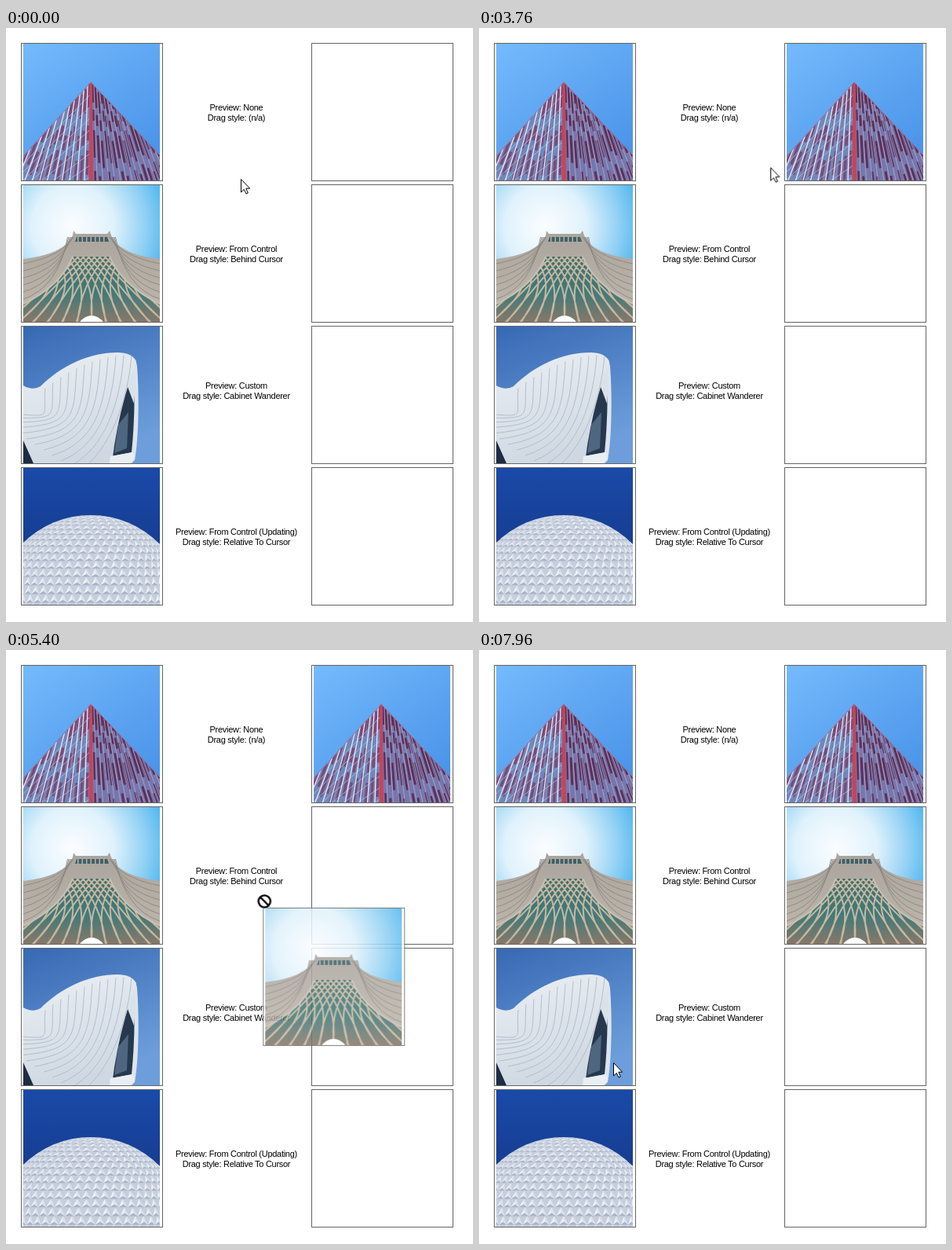
These frames come from a looping animation (595x756 px, 8000 ms). An HTML page:

```html
<!DOCTYPE html>
<html lang="en">
<head>
<meta charset="utf-8">
<title>Drag previews</title>
<style>
html, body { margin: 0; width: 100%; height: 100%; overflow: hidden; background: #fff; }
svg { display: block; }
#stage { width: 100vw; height: 100vh; }
text { font: 11px "Liberation Sans", Arial, sans-serif; letter-spacing: -.28px; text-anchor: middle; }
.box { fill: #fff; stroke: #646464; }
.line { fill: none; }

#pointer { animation: travel 8s linear infinite; }
#arrow { animation: arrow 8s step-end infinite; }
#ban { animation: ban 8s step-end infinite; }
#preview { opacity: .86; animation: preview 8s step-end infinite; }
#drop1 { animation: drop1 8s step-end infinite; }
#drop2 { animation: drop2 8s step-end infinite; }

@keyframes travel {
  0%, 3.5% { transform: translate(299px, 192px); }
  5.5%, 8% { transform: translate(293px, 174px); }
  17% { transform: translate(218px, 167px); }
  18% { transform: translate(200px, 160px); }
  20% { transform: translate(148px, 138px); }
  21% { transform: translate(140px, 135px); }
  22% { transform: translate(152px, 134px); }
  27.5% { transform: translate(392px, 128px); }
  28.5% { transform: translate(423px, 128px); }
  30.5% { transform: translate(460px, 129px); }
  31.5%, 40.5% { transform: translate(462px, 129px); }
  43% { transform: translate(440px, 140px); }
  50% { transform: translate(320px, 205px); }
  57% { transform: translate(185px, 295px); }
  60% { transform: translate(141px, 318px); }
  61%, 62% { transform: translate(130px, 322px); }
  67.5% { transform: translate(329px, 320px); }
  70.5% { transform: translate(392px, 285px); }
  72% { transform: translate(420px, 262px); }
  73.5%, 84% { transform: translate(434px, 248px); }
  87% { transform: translate(408px, 282px); }
  94% { transform: translate(262px, 438px); }
  99.5%, 100% { transform: translate(171px, 525px); }
}
@keyframes arrow {
  0%, 27.5%, 70.5%, 100% { visibility: visible; }
  21%, 62% { visibility: hidden; }
}
@keyframes ban {
  0%, 27.5%, 70.5%, 100% { visibility: hidden; }
  21%, 62% { visibility: visible; }
}
@keyframes preview {
  0%, 73.5%, 100% { visibility: hidden; }
  62% { visibility: visible; }
}
@keyframes drop1 {
  0% { visibility: hidden; }
  30.5%, 100% { visibility: visible; }
}
@keyframes drop2 {
  0% { visibility: hidden; }
  73.5%, 100% { visibility: visible; }
}
</style>
</head>
<body>
<svg id="stage" viewBox="0 0 595 756">
  <defs>
    <linearGradient id="sky1" x2=".7" y2="1">
      <stop stop-color="#74bafd"/><stop offset="1" stop-color="#4a93e8"/>
    </linearGradient>
    <radialGradient id="sky2" cx=".36" cy=".3" r=".75">
      <stop stop-color="#fbfdff"/><stop offset=".4" stop-color="#e0f2fc"/>
      <stop offset=".72" stop-color="#8fd0f4"/><stop offset="1" stop-color="#3fb0ee"/>
    </radialGradient>
    <linearGradient id="sky3" x2=".4" y2="1">
      <stop stop-color="#3768b3"/><stop offset="1" stop-color="#6d9edb"/>
    </linearGradient>
    <linearGradient id="sky4" x2="0" y2="1">
      <stop stop-color="#1a4aa8"/><stop offset=".6" stop-color="#163c90"/>
    </linearGradient>
    <linearGradient id="stone" x2="0" y2="1">
      <stop stop-color="#aaa49d"/><stop offset="1" stop-color="#c0b8ad"/>
    </linearGradient>
    <linearGradient id="vaultTone" x2="0" y2="1">
      <stop stop-color="#3c6d70"/><stop offset=".6" stop-color="#3f7a7a"/><stop offset="1" stop-color="#86786a"/>
    </linearGradient>
    <linearGradient id="shellTone" x2=".3" y2="1">
      <stop stop-color="#f0f4f8"/><stop offset="1" stop-color="#cfd8e2"/>
    </linearGradient>
    <clipPath id="leftFace"><path d="M86 49L0 143V174H86Z"/></clipPath>
    <clipPath id="rightFace"><path d="M86 49L174 142V174H86Z"/></clipPath>
    <clipPath id="vault"><path d="M63 91H110Q126 128 174 151V174H0V151Q48 128 63 91Z"/></clipPath>
    <clipPath id="shell"><path d="M0 75Q12 82 22 76C48 50 84 33 120 33Q138 33 144 44Q120 110 113 174H13L0 145Z"/></clipPath>
    <clipPath id="dome"><circle cx="86" cy="183" r="123"/></clipPath>

    <symbol id="tower" viewBox="0 0 174 174">
      <path fill="url(#sky1)" d="M0 0H174V174H0Z"/>
      <g clip-path="url(#leftFace)" class="line">
        <path fill="#7187b9" d="M0 0H174V174H0Z"/>
        <path id="leftGlass" stroke="#7d4a75" stroke-width="3.5" stroke-dasharray="19 13 31 22"/>
        <path id="floors" stroke="#a6bfe4" stroke-width=".8"/>
        <path id="mullions" stroke="#e4e9f5" stroke-width="1.3"/>
      </g>
      <g clip-path="url(#rightFace)" class="line">
        <path fill="#7478ae" d="M0 0H174V174H0Z"/>
        <path id="rightGlass" stroke="#5b3159" stroke-width="3" stroke-dasharray="27 9 14 12 35 17"/>
        <path id="ribs" stroke="#b5a2c6" stroke-width=".9"/>
      </g>
      <path d="M84.5 50L83.5 174H89L87.5 50Z" fill="#c94358"/>
      <path d="M86 49L0 143M86 49L174 142" stroke="#a26a91" class="line"/>
    </symbol>

    <symbol id="arch" viewBox="0 0 174 174">
      <path fill="url(#sky2)" d="M0 0H174V174H0Z"/>
      <path fill="url(#stone)" d="M0 94Q52 88 63 64L64 58 67 62H107L110 58 112 64Q122 88 174 94V174H0Z"/>
      <path id="slabs" class="line" stroke="#8c877f" stroke-width=".9"/>
      <path d="M68 66H107L109 72H66Z" fill="#3f6068"/>
      <path d="M69 69H107" stroke="#b7b1a7" stroke-width="6" stroke-dasharray="1.5 4" class="line"/>
      <g clip-path="url(#vault)" class="line">
        <path fill="url(#vaultTone)" d="M0 80H174V174H0Z"/>
        <path id="lattice" stroke="#c6b69e" stroke-width="2"/>
      </g>
      <path d="M63 91Q48 128 0 151M110 91Q126 128 174 151" class="line" stroke="#c9c0b3" stroke-width="2"/>
      <path d="M72 174Q79 166 87 166T102 174Z" fill="#fff"/>
    </symbol>

    <symbol id="curve" viewBox="0 0 174 174">
      <path fill="url(#sky3)" d="M0 0H174V174H0Z"/>
      <path fill="#1d2d43" d="M0 143L14 174H0Z"/>
      <path fill="#dce4ec" d="M120 34Q143 34 145 50C148 90 147 142 142 170L138 174H100Z"/>
      <path fill="#25384e" d="M140 43Q144 100 138 160L113 165Q122 90 140 43Z"/>
      <path fill="#d9e1e9" d="M140 44Q145 66 141 98L132 74Z"/>
      <path fill="#4e6680" d="M121 125L134 109 132 155 116 161Z"/>
      <g clip-path="url(#shell)" class="line">
        <path fill="url(#shellTone)" d="M0 0H174V174H0Z"/>
        <path id="contours" stroke="#aeb9c6" stroke-width=".9"/>
      </g>
      <path fill="#e9eef3" d="M111 165L140 160 142 168 136 174H110Z"/>
    </symbol>

    <symbol id="sphere" viewBox="0 0 174 174">
      <path fill="url(#sky4)" d="M0 0H174V174H0Z"/>
      <g clip-path="url(#dome)">
        <path fill="#c6cedc" d="M0 50H174V174H0Z"/>
        <path id="facet0" fill="#edf1f7"/>
        <path id="facet1" fill="#a9b4c8"/>
        <path id="facet2" fill="#dce2ec"/>
      </g>
    </symbol>
  </defs>

  <path fill="#fff" d="M0 0H595V756H0Z"/>
  <g id="rows"></g>
  <use id="drop1" href="#tower" x="392" y="20" width="174" height="174"/>
  <use id="drop2" href="#arch" x="392" y="200" width="174" height="174"/>

  <g id="pointer">
    <g id="preview">
      <rect class="box" x="-1.5" y="8.5" width="180" height="175"/>
      <use href="#arch" x="1" y="9" width="174" height="174"/>
    </g>
    <path id="arrow" d="M.5 .5V17L4.3 13.4 7 19 9.3 18 6.8 12.2H11.7Z" fill="#fff" stroke="#000"/>
    <g id="ban">
      <circle r="9.3" fill="#fff"/>
      <circle r="7.6" class="line" stroke="#000" stroke-width="2.4"/>
      <path d="M-5 -5L5 5" stroke="#000" stroke-width="2.4"/>
    </g>
  </g>
</svg>
<script>
const byId = id => document.getElementById(id);
const range = (n, fn) => Array.from({ length: n }, (_, i) => fn(i)).join('');
const draw = (id, d) => byId(id).setAttribute('d', d);

// Captions: photo, first baseline, two lines
const rows = [
  ['tower', 105, 'Preview: None', 'Drag style: (n/a)'],
  ['arch', 285, 'Preview: From Control', 'Drag style: Behind Cursor'],
  ['curve', 459, 'Preview: Custom', 'Drag style: Cabinet Wanderer'],
  ['sphere', 645, 'Preview: From Control (Updating)', 'Drag style: Relative To Cursor']
];
byId('rows').innerHTML = rows.map(([photo, y, first, second], i) => {
  const top = 19 + 180 * i;
  const box = x => `<rect class="box" x="${x}.5" y="${top}.5" width="180" height="175"/>`;
  return box(19) + box(389) +
    `<use href="#${photo}" x="22" y="${top + 1}" width="174" height="174"/>` +
    `<text x="293.5" y="${y}">${first}</text><text x="293.5" y="${y + 13}">${second}</text>`;
}).join('');

// Tower: uprights fan out from a vanishing point above the roof
const fan = (n, step, start = 0) =>
  range(n, i => `M86 ${-66 + i * 7 % 19}L${86 + start + step * i} 174`);
draw('leftGlass', fan(14, -7.5, -5));
draw('mullions', fan(11, -9.5, -8));
draw('floors', range(9, i => `M86 ${49 + i * 15}L0 ${143 + i * 10}`));
draw('rightGlass', fan(17, 6, 6));
draw('ribs', fan(14, 7.5, 8));

// Arch: slab joints follow the flared sides, lattice is a mirrored sweep
draw('slabs', range(6, i => {
  const y = 100 + i * 9, x = 64 - i * 1.5;
  return `M0 ${y}Q${50 - i} ${90 + i * 8} ${x} 66M174 ${y}Q${124 + i} ${90 + i * 8} ${174 - x} 66`;
}));
draw('lattice', range(19, i => {
  const k = i - 10, x = 87 + k * 7;
  const sweep = [x, x + 35, 87 + k * 19 + 75];
  const path = ([a, b, c]) => `M${a} 88Q${b} 125 ${c} 176`;
  return path(sweep) + path(sweep.map(v => 174 - v));
}));

// Shell: panel seams peel away from the opening
draw('contours', range(12, i => {
  const x = 138 - i * 10, y = 36 + i * i * .35;
  return `M${x} ${y}C${x - 4} ${90 + i * 3} ${112 - i * 6} ${158 - i * 4} ${70 - i * 11} ${185 - i * 7}`;
}));

// Sphere: rows of triangular facets projected from latitude and longitude
const rad = Math.PI / 180;
const point = (lon, lat) => {
  const x = 86 + 123 * Math.sin(lon * rad) * Math.cos(lat * rad);
  const y = 183 - 123 * Math.sin(lat * rad);
  return x.toFixed(1) + ' ' + y.toFixed(1);
};
const facets = ['', '', ''];
for (let row = 0; row < 16; row++) {
  const lat = row * 5.3, step = 5.6 / Math.max(.25, Math.cos(lat * rad));
  for (let lon = -90 + row % 2 * step / 2; lon < 90; lon += step) {
    const apex = point(lon + step / 2, lat + 5.3);
    const heart = point(lon + step / 2, lat + 1.8);
    const left = point(lon, lat), right = point(lon + step, lat);
    facets[0] += `M${left}L${apex}L${heart}Z`;
    facets[1] += `M${left}L${heart}L${right}Z`;
    facets[2] += `M${right}L${apex}L${heart}Z`;
  }
}
facets.forEach((d, i) => draw('facet' + i, d));
</script>
</body>
</html>
```
